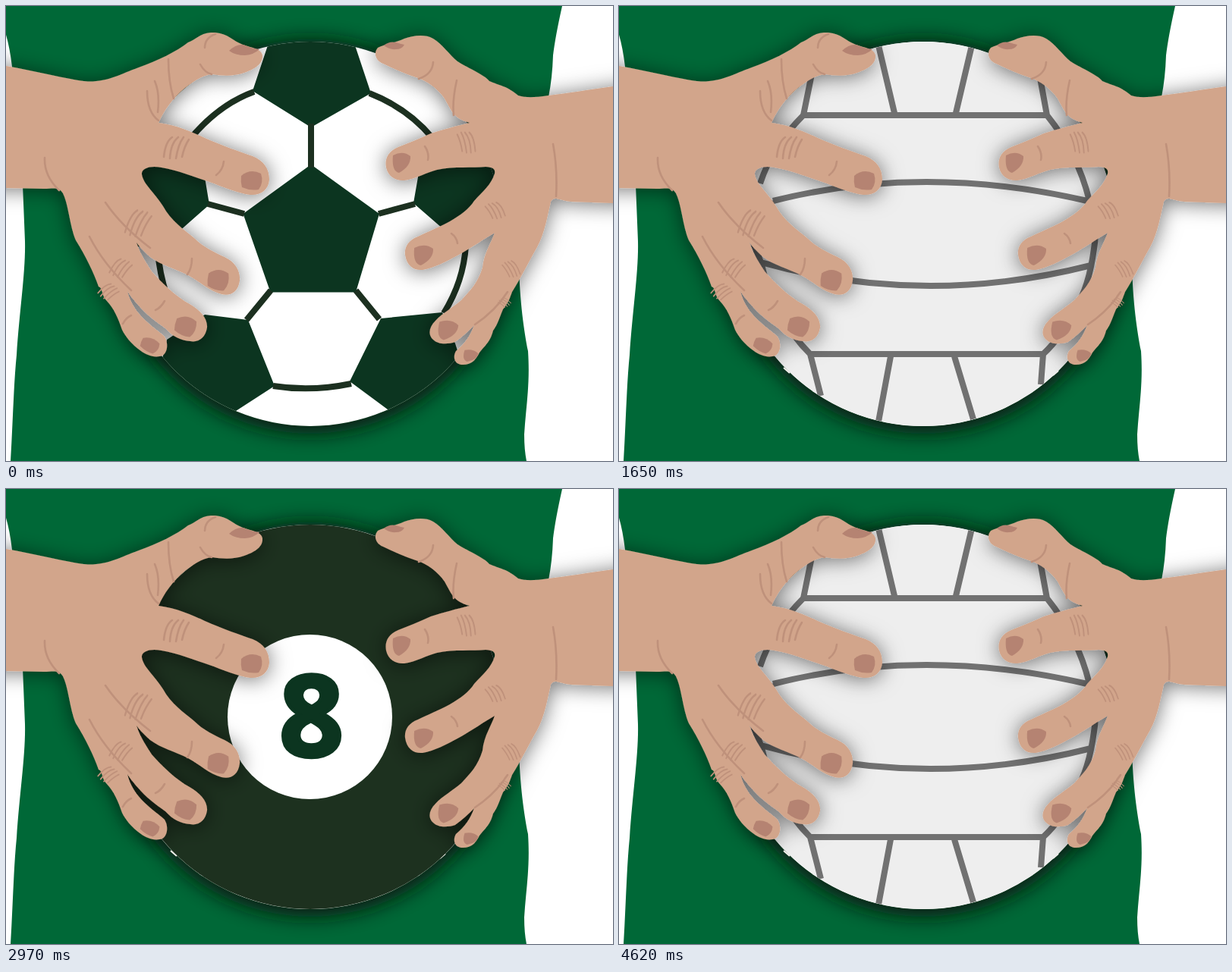
Animation of 800x600 px, one loop 4950 ms. Source, as an HTML page:

```html
<!DOCTYPE html>
<html lang="en">
<head>
<meta charset="utf-8">
<title>Hands holding a changing ball</title>
<style>
  html, body { margin: 0; width: 100%; height: 100%; overflow: hidden; background: #fff; }
  svg { display: block; width: 100vw; height: 100vh; }
  .ball { visibility: hidden; }
  .line { fill: none; stroke-width: 8; }
  .crease { fill: none; stroke: #bf917b; stroke-width: 2.6; stroke-linecap: round; }
  .nail { fill: #b58372; }
  .eight { font: 700 149px "Open Sans", "Noto Sans", sans-serif; text-anchor: middle; fill: #0c3520; stroke: #0c3520; stroke-width: 4.5; }
</style>
</head>
<body>
<svg viewBox="0 0 800 600" preserveAspectRatio="none">
  <defs>
    <clipPath id="round"><circle cx="401" cy="300.5" r="253.4"/></clipPath>
    <clipPath id="shirtClip"><use href="#shirt"/></clipPath>
    <filter id="soft" x="-20%" y="-20%" width="140%" height="140%"><feGaussianBlur stdDeviation="13"/></filter>
    <filter id="handShadow" filterUnits="userSpaceOnUse" x="-80" y="-60" width="960" height="720">
      <feDropShadow dx="0" dy="2" stdDeviation="14" flood-color="#000" flood-opacity=".55"/>
    </filter>
    <linearGradient id="red">
      <stop offset="0" stop-color="#be1a2b"/><stop offset=".5" stop-color="#b3212c"/><stop offset="1" stop-color="#be1a2b"/>
    </linearGradient>
    <path id="shirt" d="M0,0H733Q724,40 721,65Q720,95 715,120L676,340C677,390 683,430 688,455C691,500 685,530 683,565Q683,585 686,600H6C9,550 10,500 14,460C18,400 26,350 25,310L22,235L8,80Q5,55 0,38Z"/>
    <path id="nailL" d="M-14,-6Q-2,-16 12,-9Q16,3 9,12Q-2,14 -13,9Q-15,2 -14,-6Z"/>
    <path id="nailR" d="M-11,-9Q2,-16 12,-8Q13,5 -3,14Q-13,12 -11,-9Z"/>
    <path id="knuckle" d="M-16,12Q-14,-8 -5,-14M-8,14Q-7,-6 3,-14M0,14Q3,-5 10,-14M8,12Q11,-2 17,-11"/>
  </defs>

  <use href="#shirt" fill="#006837"/>
  <g clip-path="url(#shirtClip)">
    <circle cx="401" cy="304" r="260" fill="#08150e" opacity=".9" filter="url(#soft)"/>
  </g>
  <g id="rim">
    <circle cx="401" cy="300.5" r="253.6" fill="#fff"/>
    <path fill="none" stroke="#f8f5f0" stroke-width="2" d="M217,477l8,7M572,487l7,-6"/>
  </g>

  <g clip-path="url(#round)">
    <g class="ball" id="soccer" fill="#0c3520">
      <path fill="#fff" d="M140,40H660V560H140Z"/>
      <path d="M349,40L325,112L402,160L481,115L456,40ZM402,209L492,274L461,377.5H348.5L312.5,274Z
        M140,190H256L268,262L200,322L140,310ZM660,180H551L537,260L575,293L660,245Z
        M200,490L212,440L262,407L319,414L354,501L303,534L240,570ZM575,404L494,412L453,495L503,532L570,560L600,470L592,445Z"/>
      <path class="line" stroke="#1c3020" d="M402,155V213M314,274L266,261M491,274L539,261M349,375L317,414M461,375L492,413
        M352,501Q402,509 455,498M327,113Q280,130 242,176M479,115Q530,135 562,174M200,322Q202,352 212,382M606,316Q603,363 577,405"/>
    </g>

    <g class="ball" id="tennis">
      <path fill="#bbf000" d="M140,40H660V560H140Z"/>
      <path class="line" style="stroke-width:26" stroke="#f8f5f0" d="M231,114C299,240 299,370 227,485M561,106C499,200 480,375 568,490"/>
    </g>

    <g class="ball" id="bowling" fill="#16331f">
      <path fill="url(#red)" d="M140,40H660V560H140Z"/>
      <circle cx="350" cy="215" r="28"/><circle cx="441" cy="215" r="28"/><circle cx="399" cy="369" r="28"/>
    </g>

    <g class="ball" id="cricket">
      <path fill="#8a4a2f" d="M140,40H660V560H140Z"/>
      <path class="line" stroke="#b37549" style="stroke-width:5.5" stroke-dasharray="9.8 2.5" d="M146,223.5H660M148,238.5H660M150,359.5H660M148,374.5H660"/>
      <path class="line" stroke="#7f1416" stroke-dasharray="18.8 5.6" d="M147.8,263H660M147.8,334.5H660"/>
      <path class="line" stroke="#5a3020" style="stroke-width:14" d="M140,300.5H660"/>
      <path class="line" stroke="#1c3824" style="stroke-width:9" d="M140,300H660"/>
    </g>

    <g class="ball" id="pool">
      <path fill="#1d311f" d="M140,40H660V560H140Z"/>
      <circle cx="400.5" cy="300.5" r="108.5" fill="#fff"/>
      <text class="eight" x="402.5" y="353">8</text>
    </g>

    <g class="ball" id="beach" fill="#0099c8">
      <path fill="#ff0" d="M140,40H660V560H140Z"/>
      <path d="M375,224L360,163Q350,113 325,80L140,40V252L185,237Q215,226 245,226Z
        M375,224L393,163Q415,105 480,57L660,40V242L640,237Q560,219 441,216Z
        M375,224L340,281Q316,327 303,358C282,402 264,440 253,508L250,570H530L521,523C500,440 465,340 415,274Z"/>
      <ellipse cx="375" cy="224.5" rx="66" ry="62" fill="#1f7295"/>
    </g>

    <g class="ball" id="volley">
      <path fill="#eee" d="M140,40H660V560H140Z"/>
      <path class="line" stroke="#717171" d="M243,144H566M243,144L254,90M363,141L342,52M444,141L465,52M564,144L555,95
        M243,144Q202,185 186,234M564,144Q605,195 620,257M203,257Q401,207 617,257M187,338Q401,398 622,342
        M203,257Q178,295 178,315L187,338Q205,412 252,459M617,255Q632,285 626,320Q619,372 602,397Q585,435 559,459
        M250,459H561M252,459L266,514M358,462L342,548M442,462L467,545M559,459L556,499"/>
    </g>
  </g>

  <g filter="url(#handShadow)" fill="#d2a58b">
    <path d="M-80,66L0,79C37,85 80,97 108,99.5C135,100 150,90 175,81C200,72 225,60 240,48C250,45 255,36 270,35C290,34 298,45 310,50
      C322,55 337,56 338,65C339,78 325,84 314,88C300,93 285,92 272,90C258,91 245,101 236,108C220,121 208,138 201,154
      C225,157 245,166 262,174C285,184 310,193 325,198C340,204 347,215 347,229C346,243 335,250 322,249
      C305,247 285,238 268,232C250,226 225,216 205,213C190,210 178,214 179,222C181,235 195,245 207,264
      C217,283 235,295 248,306C260,318 275,325 288,331C303,338 309,350 308,362C306,378 295,383 284,380
      C268,376 255,363 240,355C222,346 205,342 190,331C180,322 175,316 172,312C178,330 186,340 192,350
      C205,365 225,384 242,393C256,401 266,412 265,424C263,438 253,444 243,442C230,441 220,436 210,425
      C196,415 184,406 174,394C167,386 163,381 160,376C163,390 172,404 183,414C193,424 203,430 209,436
      C215,446 212,458 206,461C196,465 185,460 178,455C165,446 157,435 153,427C148,412 142,398 132,388
      C125,380 128,372 122,370C115,350 105,330 92,309C84,290 82,260 75,247C70,238 62,241 50,241L0,240H-80Z"/>
    <path d="M880,95L800,106C770,110 740,115 715,118C695,121 685,121 675,118C660,105 650,105 637,99C630,90 605,80 595,73
      C585,65 575,50 563,43C550,36 535,40 525,43C515,48 500,50 490,55C484,62 487,72 497,76C510,82 525,89 540,94
      C555,98 570,110 578,122C588,140 590,148 611,154C595,158 575,163 560,168C545,175 530,181 517,186
      C503,192 499,202 501,213C504,226 515,231 525,230C540,228 555,219 568,216C590,211 615,214 632,212
      C643,213 645,215 644,221C640,235 628,245 617,257C610,268 600,275 585,284C570,292 555,298 543,304
      C530,309 525,318 526,328C528,343 538,349 549,348C565,345 580,337 595,329C615,318 630,307 644,299
      C640,312 630,325 628,345C622,365 612,375 600,388C590,397 575,405 566,415C557,424 556,434 563,440
      C570,447 583,446 592,443C602,436 610,428 617,421C612,435 605,445 593,455C588,464 592,472 600,473
      C612,474 618,468 623,459C628,450 638,445 642,428C648,420 650,412 655,400C663,390 664,385 667,377
      C678,360 690,335 700,318C710,300 714,275 718,258C722,250 728,256 745,258L800,260H880Z"/>
  </g>

  <g class="crease">
    <path d="M51,200Q50,224 70,243M186,112Q186,140 201,151M196,99Q203,115 200,140M214,70Q214,100 221,122
      M276,37Q262,42 262,55M256,77Q262,88 271,90M287,205Q286,216 277,223M245,333Q245,346 239,354
      M131,259Q152,290 190,319M110,304Q128,340 165,375M209,389Q204,398 197,401M165,408Q158,411 154,419"/>
    <use href="#knuckle" x="224" y="187"/>
    <use href="#knuckle" transform="translate(174 287) rotate(12) scale(.9 1.2)"/>
    <use href="#knuckle" transform="translate(151 346) rotate(20) scale(.75 .85)"/>
    <use href="#knuckle" transform="translate(135 377) rotate(35) scale(.65 .75)"/>
    <path d="M563,74Q562,90 544,96M594,98Q588,125 590,144M721,182Q727,215 725,251M552,185Q558,194 556,203
      M587,300Q594,305 595,313M661,377Q645,402 618,420"/>
    <use href="#knuckle" transform="translate(607 180) scale(-.72 .95)"/>
    <use href="#knuckle" transform="translate(645 270) rotate(-12) scale(-.7 .75)"/>
    <use href="#knuckle" transform="translate(666 347) rotate(-15) scale(-.6 .75)"/>
    <use href="#knuckle" transform="translate(657 391) rotate(-35) scale(-.4 .45)"/>
  </g>
  <g class="nail">
    <path d="M294,59Q303,50 313,51Q323,56 334,57Q327,64 315,65Q302,65 294,59ZM498,52Q505,46 514,48Q520,50 525,51Q522,57 514,57Q506,58 498,52Z"/>
    <use href="#nailL" x="324" y="230"/>
    <use href="#nailL" transform="translate(280 361) rotate(8) scale(1 1.1)"/>
    <use href="#nailL" transform="translate(237 422) rotate(16) scale(1 1.05)"/>
    <use href="#nailL" transform="translate(190 447) rotate(25) scale(.88 .75)"/>
    <use href="#nailR" x="521" y="206"/>
    <use href="#nailR" transform="translate(550 328) scale(1.08 1)"/>
    <use href="#nailR" transform="translate(582 427) rotate(8) scale(1.1 1)"/>
    <use href="#nailR" transform="translate(612 461) rotate(12) scale(.8 .62)"/>
  </g>
</svg>
<script>
  const SLOT = 330, HOLD = 300, LOOP = 4950;
  const order = ["soccer", "cricket", "tennis", "volley", "bowling", "volley", "cricket", "volley",
                 "bowling", "pool", "soccer", "beach", "cricket", "tennis", "volley"];
  const balls = [...document.querySelectorAll(".ball")];
  const rim = document.getElementById("rim");

  function draw() {
    const time = performance.now() % LOOP;
    const slot = Math.floor(time / SLOT);
    const blending = time % SLOT >= HOLD && slot < order.length - 1;
    const shown = [order[slot]];
    if (blending) shown.push(order[slot + 1]);

    // While blending, the upper of the two balls is half transparent.
    const visible = balls.filter(ball => shown.includes(ball.id));
    balls.forEach(ball => ball.style.visibility = visible.includes(ball) ? "visible" : "hidden");
    visible.forEach((ball, i) => ball.style.opacity = i ? 0.5 : 1);
    rim.style.visibility = slot < 2 ? "hidden" : "visible";
    requestAnimationFrame(draw);
  }
  draw();
</script>
</body>
</html>
```
